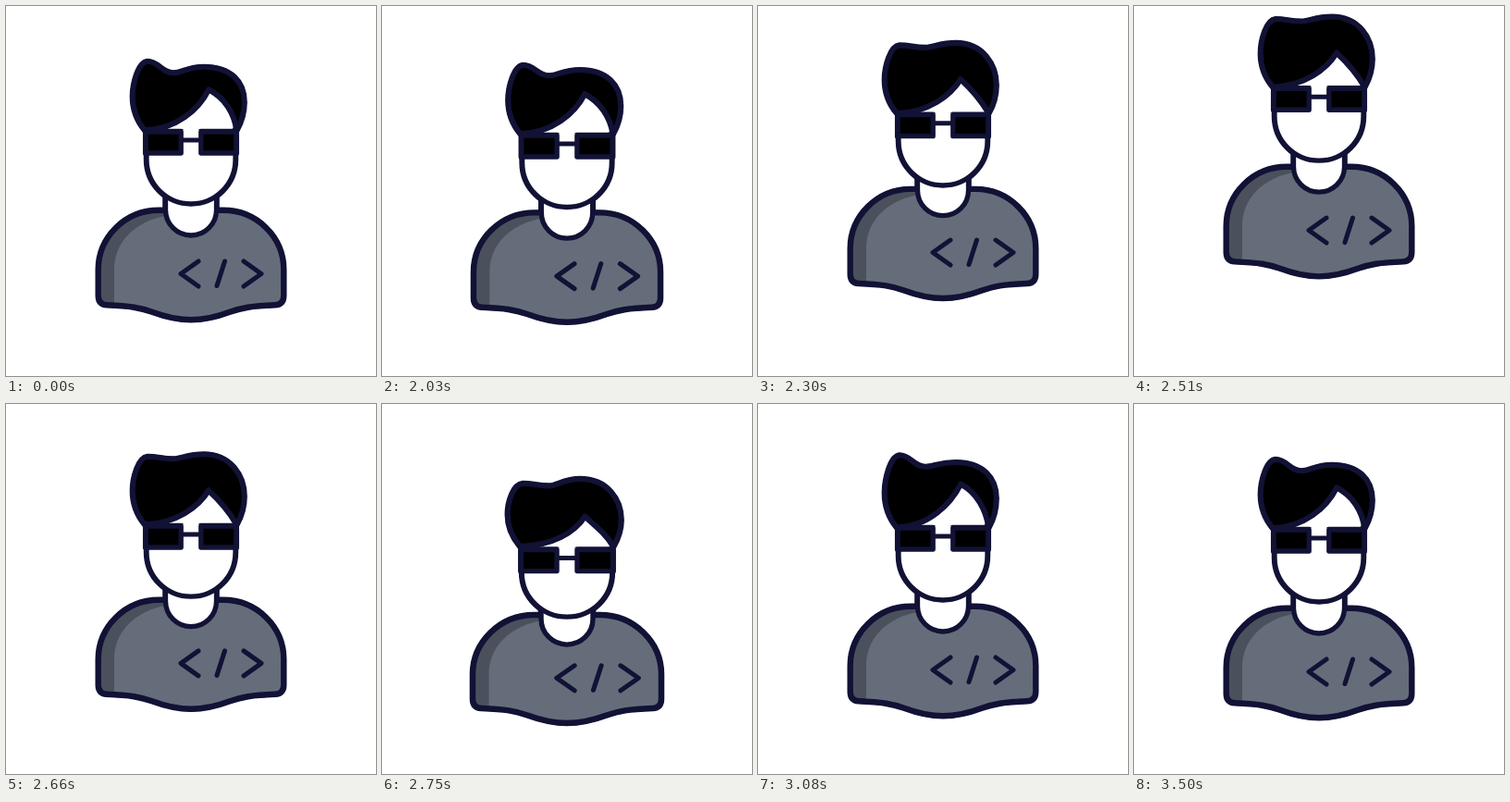
Recreate the animation shown at these times as an HTML page with a canvas. Size 400x400 px, loop 3.56 s.

```html
<!DOCTYPE html>
<html lang="en">
<head>
<meta charset="utf-8">
<title>Jumping coder</title>
<style>
html, body { margin: 0; width: 100%; height: 100%; overflow: hidden; background: #fff; }
canvas { display: block; width: 400px; height: 400px; }
</style>
</head>
<body>
<canvas id="stage"></canvas>
<script>
const LOOP = 3560, START = 2030, STEP = 30;
const INK = '#111235', GREY = '#666d7a', SHADE = '#4b515c';
const RIM = 1.2;

// time, body offset, head squash, hair flatness, hair drop
const KEYS = [
  [2000, 0, 0, 0, 0],
  [2030, 2.5, 1.5, 0.1, 0],
  [2120, 8, 12, 0.8, 2],
  [2210, 5, 10, 1, 2],
  [2300, -23.3, 5, 1, 0],
  [2380, -43.5, 1, 1, 0],
  [2460, -50, 0, 1, 0],
  [2540, -43.5, 0.5, 1, 0],
  [2600, -30, 3, 1, 0],
  [2660, -9.5, 5.5, 1, 0],
  [2790, 8, 19, 1, 5],
  [2900, 2, 21, 1, 6],
  [3080, -2, 0, 0, -2.5],
  [3230, 2, 0, 0, 1],
  [3380, -0.5, 0, 0, 0],
  [3500, 0, 0, 0, 0]
];

const canvas = document.getElementById('stage');
const ctx = canvas.getContext('2d');
const ratio = window.devicePixelRatio || 1;
canvas.width = canvas.height = 400 * ratio;
let grow = 0;

// Monotone slope: flat at turning points, harmonic mean elsewhere
function slope(i, col) {
  if (i === 0 || i === KEYS.length - 1) return 0;
  const rate = k => (KEYS[k + 1][col] - KEYS[k][col]) / (KEYS[k + 1][0] - KEYS[k][0]);
  const a = rate(i - 1), b = rate(i);
  return a * b <= 0 ? 0 : 2 * a * b / (a + b);
}

function track(t, col) {
  const last = KEYS.length - 1;
  if (t <= KEYS[0][0] || t >= KEYS[last][0]) return 0;
  const i = KEYS.findIndex(k => k[0] > t) - 1;
  const span = KEYS[i + 1][0] - KEYS[i][0];
  const u = (t - KEYS[i][0]) / span, v = 1 - u;
  return KEYS[i][col] * v * v * (1 + 2 * u) + KEYS[i + 1][col] * u * u * (3 - 2 * u)
    + span * u * v * (slope(i, col) * v - slope(i + 1, col) * u);
}

function paint(fill, width = 5.5) {
  if (fill) {
    ctx.fillStyle = fill;
    ctx.fill();
  }
  ctx.lineWidth = width + grow;
  ctx.stroke();
}

function line(points, dy, width) {
  ctx.beginPath();
  points.forEach(([x, y]) => ctx.lineTo(x, y + dy));
  paint(null, width);
}

function drawBody(top, base) {
  const shape = new Path2D();
  shape.moveTo(109, 323 + base);
  shape.quadraticCurveTo(100, 322.5 + base, 100, 313 + base);
  shape.lineTo(100, 285 + top);
  shape.bezierCurveTo(100, 250 + top, 129, 221 + top, 165, 221 + top);
  shape.lineTo(235, 221 + top);
  shape.bezierCurveTo(271, 221 + top, 300, 250 + top, 300, 285 + top);
  shape.lineTo(300, 313 + base);
  shape.quadraticCurveTo(300, 322.5 + base, 291, 323 + base);
  shape.bezierCurveTo(265, 324 + base, 255, 326 + base, 242, 330.5 + base);
  shape.bezierCurveTo(230, 335 + base, 215, 339 + base, 200, 339 + base);
  shape.bezierCurveTo(185, 339 + base, 170, 335 + base, 158, 330.5 + base);
  shape.bezierCurveTo(145, 326 + base, 135, 324 + base, 109, 323 + base);
  shape.closePath();

  ctx.save();
  ctx.clip(shape);
  ctx.fillStyle = SHADE;
  ctx.fillRect(90, 200 + top, 220, 160);
  ctx.beginPath();
  ctx.moveTo(117, 360 + base);
  ctx.lineTo(117, 285 + top);
  ctx.bezierCurveTo(117, 258 + top, 136, 232 + top, 178, 226 + top);
  ctx.lineTo(200, 221 + top);
  ctx.lineTo(310, 221 + top);
  ctx.lineTo(310, 360 + base);
  ctx.fillStyle = GREY;
  ctx.fill();
  ctx.restore();

  ctx.lineWidth = 5.8 + grow;
  ctx.stroke(shape);
}

function drawCode(dy) {
  line([[208, 276], [189, 289.5], [208, 303]], dy, 5);
  line([[236.5, 276], [228, 302.5]], dy, 5);
  line([[257, 276], [276, 289.5], [257, 303]], dy, 5);
}

function drawCup(left, right, top, middle) {
  ctx.beginPath();
  ctx.moveTo(left, top);
  ctx.lineTo(left, middle);
  ctx.arc(200, middle, (right - left) / 2, Math.PI, 0, true);
  ctx.lineTo(right, top);
  paint('#fff', 5.3);
}

function drawGlasses(dy) {
  line([[189, 145], [211, 145]], dy, 5);
  for (const x of [151.2, 210.8]) {
    ctx.beginPath();
    ctx.rect(x, 136 + dy, 38, 23);
    paint('#000', 5.3);
  }
}

function drawHair(dy, flat, drop) {
  const tip = 60 + dy + flat + drop;
  const dip = 72.5 + dy - 9 * flat + drop;
  const crown = 66 + dy - 7.5 * flat + drop * 0.3;
  const point = 90 + dy + 7 * flat + drop * 0.7;
  const end = 134 + dy - drop * 0.5;
  const side = 98 + dy;
  ctx.beginPath();
  ctx.moveTo(150, end);
  ctx.bezierCurveTo(140, end - 12, 137, side + 12, 137, side);
  ctx.bezierCurveTo(137, side - 14, 143, tip + 1, 153, tip);
  ctx.bezierCurveTo(165, tip, 168, dip, 181, dip);
  ctx.bezierCurveTo(190, dip, 196, crown, 214, crown);
  ctx.bezierCurveTo(243, crown, 257.5, side - 16, 257.5, side + 6);
  ctx.bezierCurveTo(257.5, side + 17, 254, end - 8, 249.5, end);
  ctx.bezierCurveTo(247 - 5 * flat, end - 18 + 5 * flat, 237 - 6 * flat, point + 9 + 2 * flat, 219, point);
  ctx.bezierCurveTo(208, point + 22 - 4 * flat, 184, end - 1, 150, end);
  ctx.closePath();
  paint('#000');
}

function drawFigure(t) {
  const base = track(t, 1), squash = track(t, 2);
  const face = base + squash;
  const chin = base + squash * 0.66;
  const neck = base + squash * 0.4;

  drawBody(base + squash * 0.1, base);
  drawCode(base + squash * 0.07);
  drawCup(172.5, 227.5, 200 + chin, 220.5 + neck);
  drawCup(152, 248, 134 + face, 166 + chin);
  drawHair(face, track(t, 3), track(t, 4));
  drawGlasses(face);
}

function draw(t) {
  const wide = 1 + Math.max(0, track(t, 1)) * 0.003;
  ctx.setTransform(ratio, 0, 0, ratio, 0, 0);
  ctx.fillStyle = '#fff';
  ctx.fillRect(0, 0, 400, 400);
  ctx.translate(200, 0);
  ctx.scale(wide, 1);
  ctx.translate(-200, 0);
  ctx.strokeStyle = INK;
  ctx.lineCap = ctx.lineJoin = 'round';

  // The first pass leaves a dark rim around the silhouette only
  for (grow of [RIM, 0]) drawFigure(t);
}

function tick(now) {
  const t = now % LOOP;
  draw(t < START ? 0 : START + Math.floor((t - START) / STEP) * STEP);
  requestAnimationFrame(tick);
}

draw(0);
requestAnimationFrame(tick);
</script>
</body>
</html>
```
